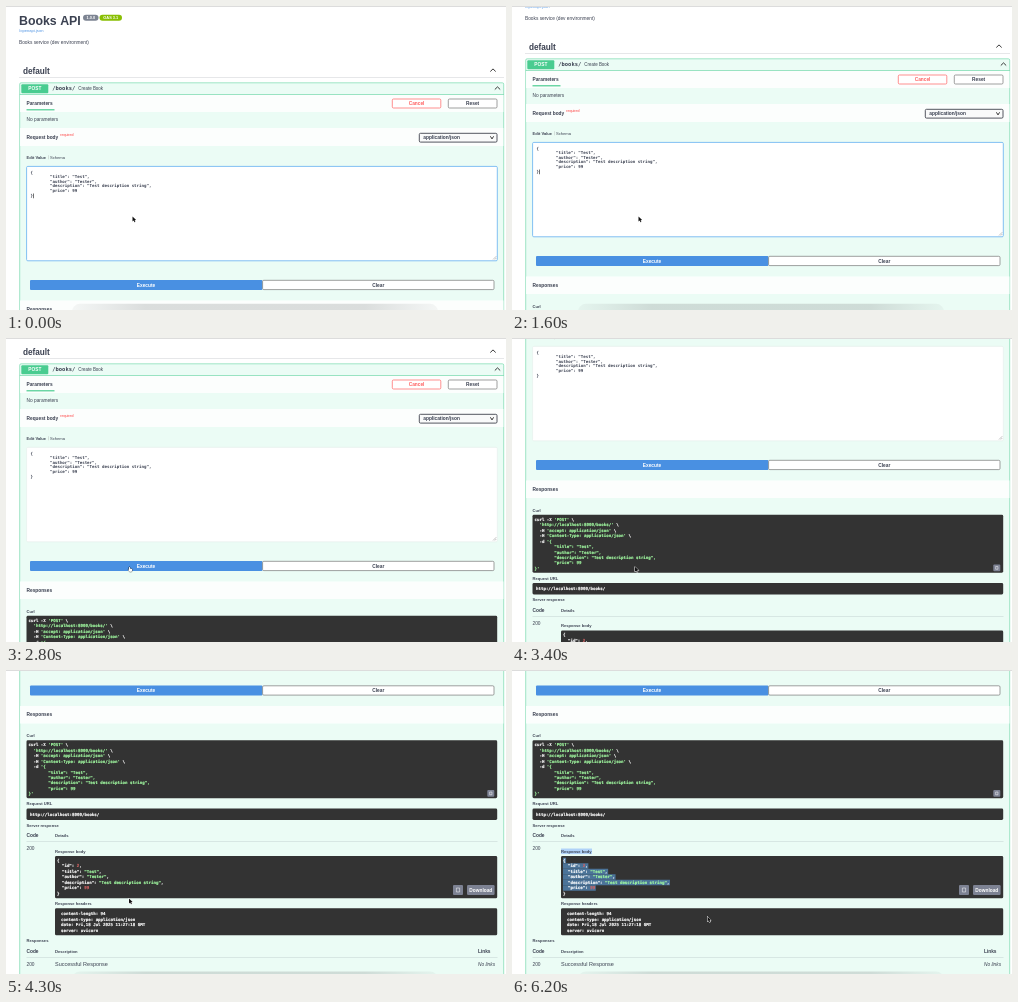
These frames come from a looping animation (500 by 304 pixels, 6.3 s). An HTML page with a canvas:

```html
<!DOCTYPE html>
<html lang="en">
<head>
<meta charset="utf-8">
<title>Books API</title>
<style>
html, body { margin: 0; width: 100%; height: 100%; overflow: hidden; background: #fff; }
canvas { display: block; width: 500px; height: 304px; }
</style>
</head>
<body>
<canvas id="stage"></canvas>
<script>
const W = 500, H = 304, LOOP = 6300, STEP = 100;
const SANS = '"Liberation Sans", Arial, sans-serif';
const MONO = '"DejaVu Sans Mono", monospace';
const INK = '#3b4151', GREEN = '#49cc90', BLUE = '#4990e2', DARK = '#333', LIME = '#a2fca2', RED = '#d36363';
const CODE = 4.12, SMALL = 4.12, BODY = 4.8;

const canvas = document.getElementById('stage');
const ctx = canvas.getContext('2d');
const dpr = window.devicePixelRatio || 1;
canvas.width = W * dpr;
canvas.height = H * dpr;

// [time, value] keys; smooth between neighbours
const SCROLL = [[800, 0], [1300, 23.5], [1500, 23.5], [1600, 24], [2200, 51], [2900, 51],
  [3400, 152], [3600, 175], [4100, 181], [4300, 258.5]];
const CURSOR_X = [[2200, 126.5], [2600, 123], [4300, 123], [5000, 48], [5700, 87], [5900, 87], [6200, 195.5]];
const CURSOR_Y = [[2200, 210.5], [2600, 229], [4300, 228.5], [5000, 180.5], [5700, 218], [5900, 218], [6200, 246.5]];
const CLICK = 2600, SELECT = 5100;

function at(keys, t) {
  if (t <= keys[0][0]) return keys[0][1];
  for (let i = 1; i < keys.length; i++) {
    const [t0, a] = keys[i - 1], [t1, b] = keys[i];
    if (t <= t1) {
      const p = (t - t0) / (t1 - t0);
      return a + (b - a) * p * p * (3 - 2 * p);
    }
  }
  return keys[keys.length - 1][1];
}

// y is the middle of the capitals
function text(s, x, y, size, { color = INK, weight = 'normal', font = SANS, align = 'left', edge = 0 } = {}) {
  ctx.font = `${weight} ${size}px ${font}`;
  ctx.fillStyle = color;
  ctx.textAlign = align;
  ctx.fillText(s, x, y + size * 0.36);
  if (edge) {
    ctx.strokeStyle = color;
    ctx.lineWidth = edge;
    ctx.strokeText(s, x, y + size * 0.36);
  }
  return ctx.measureText(s).width;
}

const bold = (s, x, y, size = BODY, opts = {}) => text(s, x, y, size, { weight: 'bold', ...opts });
const mono = (s, x, y, color = '#fff', size = CODE) =>
  bold(s, x, y, size, { font: MONO, color, edge: color === INK ? 0 : 0.16 });

function rect(x, y, w, h, fill, { r = 0, stroke, line = 0.7 } = {}) {
  ctx.beginPath();
  ctx.roundRect(x, y, w, h, r);
  if (fill) { ctx.fillStyle = fill; ctx.fill(); }
  if (stroke) { ctx.strokeStyle = stroke; ctx.lineWidth = line; ctx.stroke(); }
}

function path(points, color, width) {
  ctx.beginPath();
  points.forEach(([x, y]) => ctx.lineTo(x, y));
  ctx.strokeStyle = color;
  ctx.lineWidth = width;
  ctx.stroke();
}

const chevron = (x, y, up, w = 2.7) => {
  const d = up ? 1.3 : -1.3;
  path([[x - w, y + d], [x, y - d], [x + w, y + d]], '#222', 0.9);
};

function button(label, x, y, w, h, color, fill = '#fff') {
  rect(x, y, w, h, fill, { r: 1.2, stroke: color });
  bold(label, x + w / 2, y + h / 2, BODY, { color: color === '#777' ? INK : color, align: 'center' });
}

const band = (y, h) => rect(14, y, 483.5, h, 'rgba(255,255,255,.85)');
const rule = y => rect(20.5, y, 471, 0.5, 'rgba(59,65,81,.22)');

const BOOK = ['"title": "Test",', '"author": "Tester",', '"description": "Test description string",', '"price": 99'];
const CURL = ["curl -X 'POST' \\", "  'http://localhost:8000/books/' \\", "  -H 'accept: application/json' \\",
  "  -H 'Content-Type: application/json' \\", "  -d '{", ...BOOK.map(s => '        ' + s), "}'"];
const REPLY = ['{', ...['"id": 2,', ...BOOK].map(s => '  ' + s), '}'];
const HEADERS = ['content-length: 94', 'content-type: application/json',
  'date: Fri,18 Jul 2025 11:27:18 GMT', 'server: uvicorn'];

function runs(parts, x, y) {
  for (const [s, color] of parts) x += mono(s, x, y, color);
}

function curlParts(s, i) {
  if (i > 4) return [[s, LIME]];
  const open = s.indexOf("'"), close = s.lastIndexOf("'") + 1;
  if (close === open + 1) return [[s.slice(0, open), '#fff'], [s.slice(open), LIME]];
  return [[s.slice(0, open), '#fff'], [s.slice(open, close), LIME], [s.slice(close), '#fff']];
}

function jsonParts(s) {
  const m = s.match(/^(.*": )(".*"|\d+)(,?)$/);
  return m ? [[m[1], '#fff'], [m[2], m[2][0] === '"' ? LIME : RED], [m[3], '#fff']] : [[s, '#fff']];
}

function copyIcon(x, y, w, h) {
  rect(x, y, w, h, '#7d8293', { r: 1 });
  rect(x + w * 0.34, y + h * 0.3, w * 0.32, h * 0.4, null, { stroke: '#fff', line: 0.5 });
}

function drawTop() {
  bold('Books API', 13, 14.2, 12.35);
  rect(77, 8.8, 15.5, 6, '#7d8492', { r: 3 });
  bold('1.0.0', 84.8, 11.8, 3.9, { color: '#fff', align: 'center' });
  rect(93.5, 8.8, 22.5, 6, '#89bf04', { r: 3 });
  bold('OAS 3.1', 104.8, 11.8, 3.9, { color: '#fff', align: 'center' });
  text('/openapi.json', 13, 24.4, SMALL, { color: BLUE });
  text('Books service (dev environment)', 13, 36.5, BODY);
  bold('default', 16.9, 64.7, 8.23);
  chevron(487, 64.2, true);
  rect(13, 71.3, 485, 0.5, 'rgba(59,65,81,.25)');
}

function drawRequest(clicked) {
  rect(13.7, 76.8, 484, 560, '#ebfcf5', { r: 1.4, stroke: GREEN, line: 0.5 });
  rect(15.3, 78.3, 27, 9, GREEN, { r: 1 });
  bold('POST', 28.8, 82.6, BODY, { color: '#fff', align: 'center' });
  mono('/books/', 46.3, 82.4, INK, 5.45);
  text('Create Book', 72.3, 82.5, 4.46);
  chevron(491.5, 82.2, true);
  rect(13.7, 88.5, 484, 0.5, GREEN);

  band(89, 17);
  bold('Parameters', 20.5, 97.2);
  rect(20.5, 103.2, 28, 1.2, GREEN);
  button('Cancel', 386.3, 93, 48.5, 9, '#ff6060');
  button('Reset', 442.3, 93, 48.7, 9, '#777');
  text('No parameters', 20.5, 113.4, BODY);

  band(122, 18);
  bold('Request body', 20.5, 131.1);
  text('required', 54.3, 128.9, 3.6, { color: '#f33' });
  rect(413.3, 127.3, 77.7, 8.8, '#f9fafa', { r: 1.2, stroke: '#41444e', line: 0.9 });
  bold('application/json', 417.3, 131.5);
  chevron(486, 131.6, false, 1.6);
  bold('Edit Value', 20.5, 151.4, SMALL);
  rect(42, 149.3, 0.3, 4, '#999');
  text('Schema', 44, 151.4, SMALL);

  rect(20.6, 160.4, 470.7, 94.4, '#fff', { r: 1.2, stroke: clicked ? '#dfe5e2' : '#74b9f2', line: clicked ? 0.4 : 0.9 });
  mono('{', 24.5, 166.2, INK);
  BOOK.forEach((s, i) => mono(s, 44, 170.7 + i * 4.65, INK));
  mono('}', 24.5, 189.5, INK);
  if (!clicked) rect(27.2, 187.4, 0.6, 4.8, '#111');
  path([[487, 253.5], [490.3, 250.2]], '#888', 0.5);
  path([[488.8, 253.5], [490.3, 252]], '#888', 0.5);

  rect(24, 274, 232.5, 9.9, BLUE, { r: 1 });
  bold('Execute', 140, 278.9, BODY, { color: '#fff', align: 'center' });
  button('Clear', 256.6, 274.3, 231.4, 9.3, '#777');
}

function drawResponse(selected) {
  band(294.5, 17.5);
  bold('Responses', 20.5, 303);

  bold('Curl', 20.5, 324.4, SMALL);
  rect(20.5, 328.8, 470.7, 57.9, DARK, { r: 1.4 });
  CURL.forEach((s, i) => runs(curlParts(s, i), 22.5, 333.4 + i * 5.44));
  copyIcon(481.3, 378.5, 7, 6.8);

  bold('Request URL', 20.5, 392.5, SMALL);
  rect(20.5, 397.1, 470.7, 11.4, DARK, { r: 1.4 });
  mono('http://localhost:8000/books/', 24, 402.8);

  bold('Server response', 20.5, 414, SMALL);
  bold('Code', 20.5, 424.2);
  bold('Details', 49, 424.2, SMALL);
  rule(430);
  text('200', 20.5, 437, BODY);

  if (selected > 0) rect(49, 437, 31, 5.6, '#b0d2f8');
  bold('Response body', 49, 440, SMALL);
  rect(49, 444.6, 442.2, 42.2, DARK, { r: 1.4 });
  REPLY.forEach((s, i) => {
    const y = 449 + i * 5.5;
    if (i + 1 < selected) {
      ctx.font = `bold ${CODE}px ${MONO}`;
      rect(51, y - 2.75, ctx.measureText(s).width + 0.6, 5.5, '#4b7398');
    }
    runs(jsonParts(s), 51, y);
  });
  copyIcon(447, 473.6, 10, 9.8);
  rect(461, 473.6, 27.6, 9.8, '#7d8293', { r: 1.2 });
  bold('Download', 474.8, 478.5, BODY, { color: '#fff', align: 'center' });

  bold('Response headers', 49, 492.2, SMALL);
  rect(49, 496.8, 442.2, 27, DARK, { r: 1.4 });
  HEADERS.forEach((s, i) => mono(s, 55, 502.4 + i * 5.4));

  bold('Responses', 20.5, 528.8, SMALL);
  bold('Code', 20.5, 540);
  bold('Description', 49, 540, SMALL);
  bold('Links', 472, 540);
  rule(546);
  text('200', 20.5, 552.9, BODY);
  text('Successful Response', 49, 552.9, 5.5);
  text('No links', 472, 552.9, BODY, { weight: 'italic' });
}

// soft rounded shade along the bottom edge
function drawShade(top) {
  const g = ctx.createLinearGradient(66, 0, 432, 0);
  g.addColorStop(0, 'rgba(150,155,155,.08)');
  g.addColorStop(0.2, 'rgba(140,145,145,.3)');
  g.addColorStop(0.8, 'rgba(140,145,145,.3)');
  g.addColorStop(1, 'rgba(150,155,155,.08)');
  rect(66, top, 366, 20, g, { r: 8 });
}

const ARROW = [[0, 0], [0, 5], [1.2, 4], [2, 5.8], [2.9, 5.4], [2.1, 3.7], [3.6, 3.6]];
const HAND = [[0, 0], [0.8, 0], [1, 1.6], [3.2, 2.1], [3.2, 3.6], [2.6, 4.8], [0.6, 4.8], [-1, 2.9], [-0.5, 2.4], [0, 2.7]];

function drawCursor(x, y, t) {
  ctx.save();
  ctx.translate(x, y);
  if (t >= 5000 && t < 6000) {
    rect(-0.7, -3, 1.4, 6, 'rgba(255,255,255,.7)');
    rect(-0.3, -3, 0.6, 6, '#111');
  } else {
    const hand = t >= 2500 && t < 3400;
    ctx.beginPath();
    (hand ? HAND : ARROW).forEach(([px, py]) => ctx.lineTo(px, py));
    ctx.closePath();
    ctx.lineJoin = 'round';
    ctx.lineWidth = hand ? 0.7 : 1;
    ctx.strokeStyle = hand ? '#111' : '#fff';
    ctx.fillStyle = hand ? '#fff' : '#111';
    ctx.stroke();
    ctx.fill();
  }
  ctx.restore();
}

function draw(t) {
  ctx.setTransform(dpr, 0, 0, dpr, 0, 0);
  ctx.lineJoin = 'round';
  rect(0, 0, W, H, '#fff');
  ctx.save();
  ctx.translate(0, -at(SCROLL, t));
  drawTop();
  drawRequest(t >= CLICK);
  drawResponse(t < SELECT ? 0 : Math.min(7, (t - SELECT) / STEP + 1));
  ctx.restore();
  if (t < 2200) drawShade(297.8);
  else if (t >= 4300) drawShade(301.5);
  rect(0, 0, W, 1, '#dcdcdc');
  drawCursor(at(CURSOR_X, t), at(CURSOR_Y, t), t);
}

const start = performance.now();
function tick() {
  const t = (performance.now() - start) % LOOP;
  draw(Math.floor(t / STEP) * STEP);
  requestAnimationFrame(tick);
}
tick();
</script>
</body>
</html>
```
